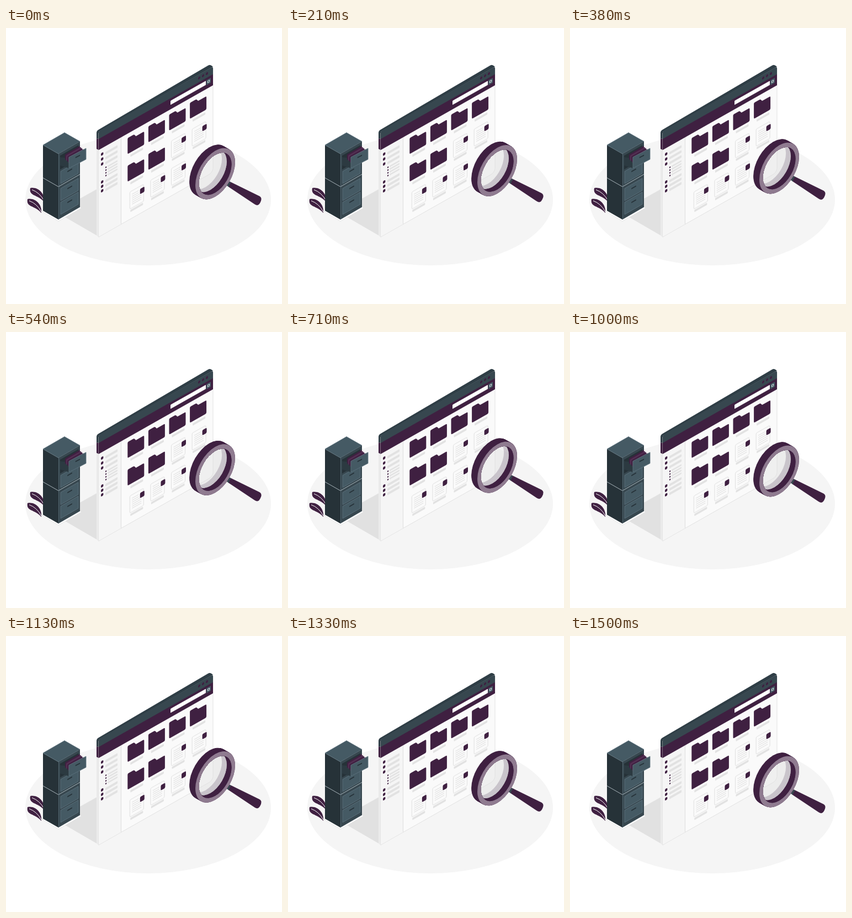
Write an HTML page with a canvas that moves like this. It is 500 by 500 pixels and loops after 1.54 s.

```html
<!DOCTYPE html>
<html lang="en">
<head>
<meta charset="utf-8">
<title>File search</title>
<style>
  html, body { margin: 0; width: 100%; height: 100%; overflow: hidden; background: #fff; }
  canvas { display: block; width: 500px; height: 500px; }
</style>
</head>
<body>
<canvas id="stage" width="500" height="500"></canvas>
<script>
const ctx = document.getElementById('stage').getContext('2d');
const PURPLE = '#3f2041', MAUVE = '#8f7b90', SLATE = '#37474f', STEEL = '#455a64';
const INK = '#263238', EDGE = '#607580', PALE = '#e2e2e2', PAPER = '#fafafa';
const LOOP = 1540, FRAMES = 37;

function shape(fill, path, stroke, width = 0.7) {
  const p = new Path2D(path);
  if (fill) { ctx.fillStyle = fill; ctx.fill(p); }
  if (stroke) { ctx.strokeStyle = stroke; ctx.lineWidth = width; ctx.stroke(p); }
}

function box(fill, x, y, w, h, r = 0, stroke) {
  const p = new Path2D();
  p.roundRect(x, y, w, h, r);
  shape(fill, p, stroke);
}

function oval(fill, x, y, rx, ry, stroke) {
  const p = new Path2D();
  p.ellipse(x, y, rx, ry, 0, 0, Math.PI * 2);
  shape(fill, p, stroke, 1);
}

// Draws on an upright plane through (x, y) that rises or falls by slope.
function onPlane(x, y, slope, paint) {
  ctx.save();
  ctx.transform(1, slope, 0, 1, x, y);
  paint();
  ctx.restore();
}

function floor() {
  oval('#f5f5f5', 257.5, 311, 222.5, 119);
  shape('#e1e1e1', 'M106 342L168 378V290L134 309Z');
}

function leaf(x, y) {
  ctx.save();
  ctx.translate(x, y);
  shape(PURPLE, 'M0 0C2-16-12-28-25-25C-28-10-12-14 0 0Z');
  shape(null, 'M-22-22Q-8-17 0-2', '#fff', 1);
  ctx.restore();
}

function drawer(x, y, w, h) {
  box(STEEL, x, y, w, h, 0, EDGE);
  box(INK, x + w * .38, y + h * .3, w * .27, 2);
}

function cabinet() {
  const x = 95, y = 347, slope = .575, left = 28, right = 39, height = 119;
  shape('#fff', 'M65 332L95 350L137 326L106 308Z', '#dedede');
  onPlane(x, y, slope, () => {
    box(INK, -left, -height, left, height);
    box('#aab6bb', -left, -60, left, 1);
  });
  shape(STEEL, 'M67 212L106 189.5L134 205.5L95 228Z', EDGE);
  onPlane(x, y, -slope, () => {
    box(SLATE, 0, -height, right, height);
    box('#aab6bb', 0, -60, right, 1);
    box(EDGE, 0, -height, .7, height);
    [-29, -54, -85].forEach(top => drawer(4, top, 32, 22));
    box(INK, 3, -114, 33, 25);
  });
  shape('#2c3a41', 'M98 234L114 236V254L98 249Z');
  onPlane(107, 229, -slope, () => {
    for (let i = 0; i < 4; i++) box(i % 2 ? '#532f52' : PURPLE, i * 2, i * 3, 27, 10, 1);
  });
  onPlane(114, 234, -.52, () => drawer(0, 0, 31, 20));
}

function sidebar() {
  box('#f5f5f5', 0, 220, 40, 158);
  box('#dedede', 40, 220, 1, 158);
  for (let i = 0; i < 6; i++) {
    const y = i < 3 ? 231.5 + i * 9 : 282 + (i - 3) * 8;
    box(PURPLE, 4, y - 2.2, 4.4, 5, 1.7);
    box(PALE, 12, y, 22, 4.5, 1);
  }
  for (let i = 0; i < 4; i++) {
    const y = 258.5 + i * 5;
    box(PURPLE, 12, y, 2.2, 2.5, .7);
    box(PALE, 16, y, 18, 2.8, .8);
  }
}

function folder(x, y) {
  shape(PURPLE, `M${x} ${y + 1}q0-2 2-2h8q2 0 3 2l2 3h13q2 0 2 2v20q0 2-2 2h-26q-2 0-2-2Z`);
}

function file(x, y) {
  box(PAPER, x + 4, y - 1, 25, 31, 2, '#dadada');
  for (let i = 0; i < 6; i++) box('#dcdcdc', x + 8, y + 5 + i * 3.6, i < 2 ? 12 : 17, 1);
  box(PURPLE, x + 22.5, y + 4, 8, 9.5, 2);
}

function header() {
  box(SLATE, 0, 187, 207, 16, [2, 3, 0, 0]);
  box(PURPLE, 0, 201, 207, 20);
  for (let i = 0; i < 3; i++) oval(PURPLE, 182 + i * 7, 193.5, 2.1, 2.3);
  box('#fff', 130, 205.5, 64, 7.5, 1);
  box(STEEL, 195, 205, 8, 9, 1);
  oval(null, 199, 209.4, 1.8, 1.8, '#d5dce0');
}

function browser() {
  shape('#ebebeb', 'M164 190L168 188V379L164 376Z');
  shape(PURPLE, 'M164 200L168 201V221L164 219Z');
  shape('#2f3e46', 'M164 200V190Q164 186 168 184L366 68Q369 66 372 68L375 70L168 188V201Z');
  onPlane(168, 0, -.566, () => {
    box(PAPER, 0, 190, 207, 188.5, [0, 0, 7, 0], '#dcdcdc');
    sidebar();
    header();
    for (let i = 0; i < 11; i++) {
      const row = Math.floor(i / 4), col = i % 4;
      const x = 52.3 + col * 37.6, y = 230 + row * 50;
      (i < 6 ? folder : file)(x, y);
      box(PALE, x + 5, y + 32, 23, 4, 1);
    }
  });
}

// Path of an upright isometric circle, optionally cut out of the whole stage.
function ring(x, y, r, outside = false) {
  const p = new Path2D(), circle = new Path2D();
  if (outside) p.rect(0, -50, 500, 600);
  circle.arc(0, 0, r, 0, Math.PI * 2);
  p.addPath(circle, new DOMMatrix([.866, -.5, 0, 1, x, y]));
  return p;
}

function magnifier(lift) {
  const x = 379, y = 264, radius = 41.5, hole = 34.2, depth = 12.6;
  // Points along the thickness of the rim: 0 is the front, 1 the back.
  const disc = (d, r, outside) => ring(x - d * depth * .866, y - d * depth * .5, r, outside);

  ctx.save();
  ctx.translate(0, -lift);
  shape(PURPLE, 'M405 278L459 304.5Q464 307 462 313Q459 321 455 321Q453 321 450 319L402 287Z');
  shape(SLATE, 'M402 277L408 280Q404 283 404 288L399 285Z');

  ctx.save();
  ctx.clip(disc(0, hole, true), 'evenodd');
  for (let d = 1; d >= 0; d -= 1 / 24) shape(PURPLE, disc(d, radius));
  shape(MAUVE, disc(0, radius));
  ctx.restore();

  ctx.clip(disc(0, hole));
  ctx.fillStyle = PURPLE;
  ctx.fill(disc(.8, hole, true), 'evenodd');
  ctx.clip(disc(.8, hole));
  shape('rgba(225,225,225,.45)', disc(0, radius));
  ctx.fillStyle = 'rgba(120,105,125,.3)';
  ctx.fill(disc(1.6, hole, true), 'evenodd');
  ctx.restore();
}

function draw(now) {
  const step = Math.floor((now % LOOP + 5) * FRAMES / LOOP) % FRAMES;
  const phase = (step + .6) % 36;
  const lift = 20 * (1 - Math.abs(phase - 18) / 18) - .7;
  ctx.clearRect(0, 0, 500, 500);
  floor();
  leaf(69, 315);
  leaf(64, 336 - 1);
  cabinet();
  browser();
  magnifier(lift);
}

const start = performance.now();
function tick() {
  draw(performance.now() - start);
  requestAnimationFrame(tick);
}
tick();
</script>
</body>
</html>
```
